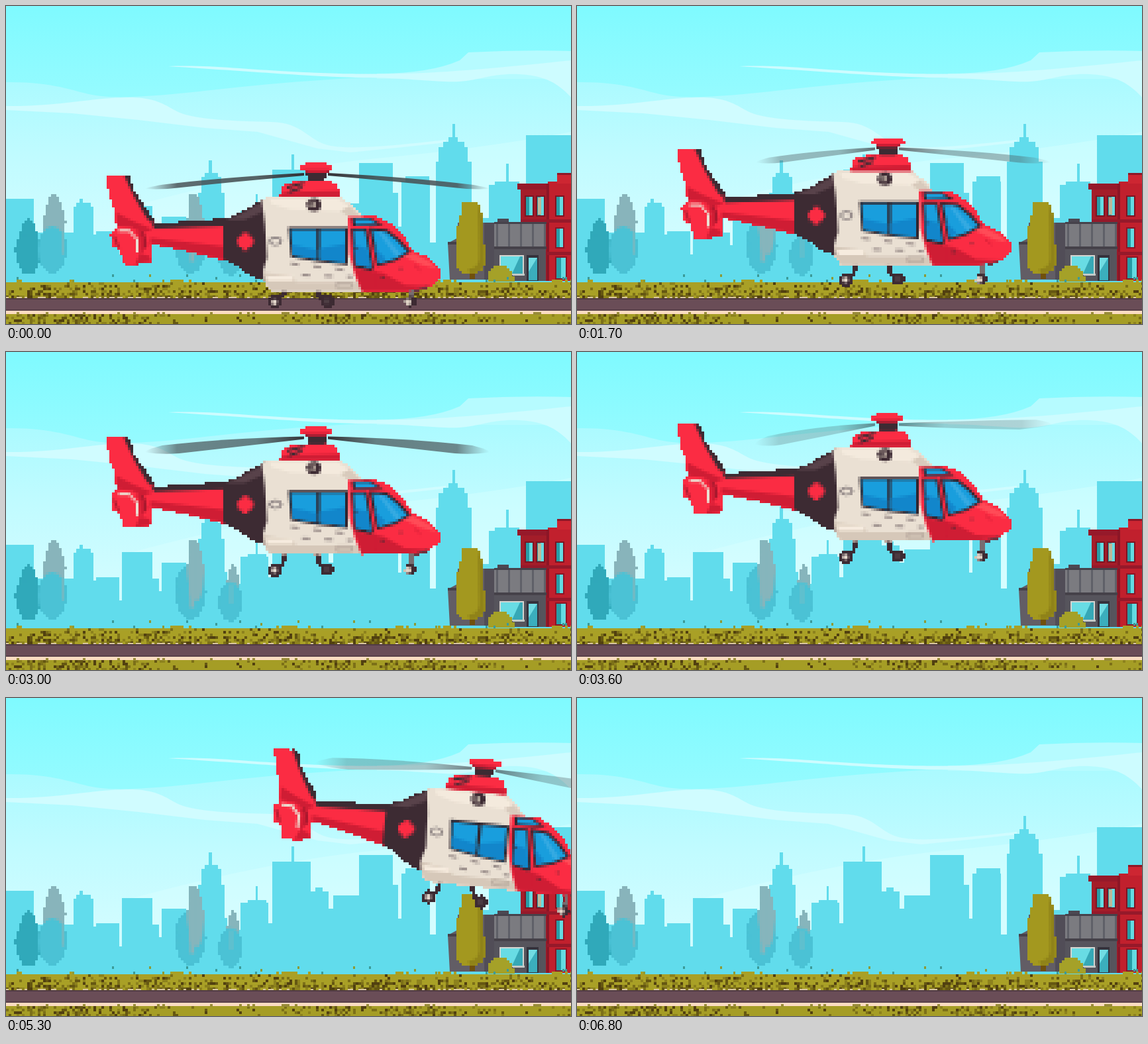
Animation, 853 px wide and 480 px high, one loop 6.9 s. Source, as an HTML page with a canvas:

```html
<!DOCTYPE html>
<html lang="en">
<head>
<meta charset="utf-8">
<title>Helicopter take-off</title>
<style>
html, body { margin: 0; width: 100%; height: 100%; overflow: hidden; background: #80fbff; }
canvas { display: block; width: 853px; height: 480px; }
</style>
</head>
<body>
<canvas id="stage" width="853" height="480"></canvas>
<script>
const W = 853, H = 480, LOOP = 6900, STEP = 100, CELL = 4;
const stage = document.getElementById('stage').getContext('2d');

function makeLayer(w, h) {
  const canvas = document.createElement('canvas');
  canvas.width = w;
  canvas.height = h;
  return canvas.getContext('2d', { willReadFrequently: true });
}

function fill(c, color, d) {
  c.fillStyle = color;
  c.fill(new Path2D(d));
}

function line(c, color, width, d) {
  c.strokeStyle = color;
  c.lineWidth = width;
  c.stroke(new Path2D(d));
}

function box(c, color, x, y, w, h) {
  c.fillStyle = color;
  c.fillRect(x, y, w, h);
}

function disc(c, color, x, y, rx, ry = rx) {
  c.fillStyle = color;
  c.beginPath();
  c.ellipse(x, y, rx, ry, 0, 0, Math.PI * 2);
  c.fill();
}

function seeded(seed) {
  return () => (seed = (seed * 16807) % 2147483647) / 2147483647;
}

// Draws at a quarter of the size with hard edges, then enlarges to blocks.
const mosaic = makeLayer(Math.ceil(W / CELL), H / CELL);
function blocky(target, draw) {
  const { width, height } = mosaic.canvas;
  mosaic.setTransform(1, 0, 0, 1, 0, 0);
  mosaic.clearRect(0, 0, width, height);
  mosaic.setTransform(1 / CELL, 0, 0, 1 / CELL, 0, 0);
  draw(mosaic);
  const image = mosaic.getImageData(0, 0, width, height);
  for (let i = 3; i < image.data.length; i += 4) image.data[i] = image.data[i] > 115 ? 255 : 0;
  mosaic.putImageData(image, 0, 0);
  target.imageSmoothingEnabled = false;
  target.drawImage(mosaic.canvas, 0, 0, width * CELL, height * CELL);
}

function gradient(c, y0, y1, ...colors) {
  const g = c.createLinearGradient(0, y0, 0, y1);
  colors.forEach((color, i) => g.addColorStop(i / (colors.length - 1), color));
  return g;
}

function drawSky(c) {
  box(c, gradient(c, 0, 130, '#7ffaff', '#94fbff'), 0, 0, W, H);
  fill(c, gradient(c, 110, 340, '#abfaff', '#c0fbff', '#d0fcff'),
    'M0 115C70 114 100 128 130 134S210 138 300 128S460 112 540 108L853 100V420H0Z');
  fill(c, 'rgba(225,254,255,.3)', 'M180 305Q400 245 560 230T853 190V420H180Z');
  fill(c, '#b6fbff', 'M560 102Q640 102 685 82L698 70Q775 66 853 68V110H560Z');
  fill(c, '#cdfcff', 'M245 91C310 89 350 95 430 99S540 103 600 102S760 92 853 82' +
    'V138C835 118 815 105 775 103S715 112 685 114S600 108 540 108S360 98 245 91Z');
  fill(c, '#d0fcff', 'M0 151C80 152 130 138 185 138S245 158 275 165S350 174 400 175S455 204 490 211' +
    'S610 208 664 202V206L600 213L520 221L470 215L380 190L300 184L200 172L100 162L0 157Z');
}

// Each pair is a left edge and the roof height from there on.
const ROOFS = [0, 291, 42, 342, 102, 303, 132, 345, 136, 340, 171, 375, 175, 302, 221, 342,
  231, 361, 235, 318, 272, 325, 290, 282, 295, 258, 325, 282, 330, 332, 334, 350, 354, 309,
  396, 340, 402, 247, 460, 292, 487, 318, 494, 298, 533, 237, 584, 282, 592, 333, 597, 265,
  640, 357, 649, 235, 703, 320, 729, 270, 785, 195, 853, 0];

function drawSkyline(c) {
  const color = '#61dcec';
  for (let i = 0; i < ROOFS.length - 2; i += 2) {
    box(c, color, ROOFS[i], ROOFS[i + 1], ROOFS[i + 2] - ROOFS[i], 420 - ROOFS[i + 1]);
  }
  const tops = [[106, 297, 22], [111, 291, 5], [300, 252, 20], [306, 233, 5], [365, 305, 28],
    [377, 284, 3], [431, 224, 4], [467, 286, 11], [603, 257, 36], [653, 213, 44],
    [660, 205, 32], [668, 198, 14], [674, 178, 4], [738, 265, 37], [755, 238, 4]];
  for (const [x, y, w] of tops) box(c, color, x, y, w, 45);
}

function drawFarTrees(c) {
  const spindle = (color, x, top, bottom, half) => fill(c, color,
    `M${x} ${top}L${x + half * .45} ${top + 8}L${x + half} ${top + 42}Q${x + half} ${bottom - 12} ${x + half * .4} ${bottom}` +
    `H${x - half * .4}Q${x - half} ${bottom - 12} ${x - half} ${top + 42}L${x - half * .45} ${top + 8}Z`);
  spindle('#30a9ba', 34, 319, 405, 18);
  fill(c, '#30a9ba', 'M22 345L13 367L20 394L34 404V345Z');
  spindle('#88b4bb', 73, 282, 378, 17);
  disc(c, '#4bc2d5', 70, 368, 22, 36);
  line(c, '#70bac4', 4, 'M86 340V375');
  disc(c, '#4bc2d5', 279, 362, 23, 42);
  spindle('#86b5bc', 286, 283, 375, 13);
  line(c, '#86b5bc', 7, 'M281 284V386');
  fill(c, '#4bc2d5', 'M258 340L269 325L276 350V400L264 392Z');
  spindle('#86b5bc', 343, 319, 364, 12);
  disc(c, '#4bc2d5', 339, 377, 18, 30);
  line(c, '#72bec8', 4, 'M340 350V380');
}

function windowPane(c, x, y, w, h, frame) {
  box(c, frame, x - 2, y - 2, w + 4, h + 4);
  box(c, '#279da6', x, y, w, h);
  box(c, '#64dbe2', x + w / 2, y, w / 2, h);
}

function drawHouses(c) {
  box(c, '#a41d29', 777, 275, 42, 140);
  box(c, '#c1202d', 818, 265, 35, 150);
  box(c, '#cd2632', 832, 254, 21, 14);
  box(c, '#8f1727', 832, 252, 21, 3);
  box(c, '#96192a', 772, 268, 48, 9);
  box(c, '#8c1626', 816, 268, 4, 147);
  for (const y of [322, 371]) box(c, '#96192a', 777, y, 76, 5);
  for (const x of [785, 802, 831]) windowPane(c, x, 288, 10, 28, '#7d1422');
  box(c, '#bdb99b', 803, 289, 5, 26);
  windowPane(c, 831, 336, 10, 28, '#8b1626');
  windowPane(c, 831, 380, 14, 31, '#8b1626');

  fill(c, '#625d65', 'M667 358L682 350V327H738V413H670Z');
  box(c, '#514d57', 722, 327, 16, 86);
  box(c, '#454049', 667, 356, 16, 4);
  box(c, '#4c4852', 742, 321, 17, 8);
  box(c, '#56545c', 737, 365, 78, 50);
  box(c, '#7b7b80', 737, 327, 78, 38);
  for (let x = 740; x < 815; x += 18) box(c, '#5f6068', x, 329, 3, 34);
  box(c, '#46424b', 737, 326, 79, 3);
  box(c, '#454149', 737, 363, 79, 4);
  box(c, '#d2d5d1', 745, 376, 37, 30);
  box(c, '#36a8b6', 747, 378, 33, 26);
  fill(c, '#68dce4', 'M747 378H776L764 404H747Z');
  box(c, '#c2cbc9', 765, 404, 18, 3);
  box(c, '#35323c', 786, 376, 18, 39);
  box(c, '#3baebd', 789, 380, 13, 34);
  fill(c, '#71dce3', 'M789 380H802L789 401Z');
}

function drawNearTrees(c) {
  line(c, '#70500d', 6, 'M703 396V413');
  fill(c, '#a3981f', 'M690 297Q703 292 714 299L720 324L722 390Q719 403 705 403Q688 405 682 397V333Z');
  fill(c, '#8f8219', 'M713 299L720 324L722 390Q719 403 705 403Q694 400 699 397Q716 395 714 377Z');
  fill(c, '#a5a128', 'M728 415V403L739 393L749 390L762 400L769 415Z');
}

function drawGround(c) {
  const random = seeded(4711);
  const cell = (color, x, y, w = 4) => box(c, color, x, y, w, 4);
  const darks = ['#655712', '#7c7018', '#514010', '#8d821d'];
  const dark = () => darks[Math.floor(random() * darks.length)];
  box(c, '#a9a026', 0, 417, W, 24);
  for (let x = 0; x < W; x += 4) {
    const crest = Math.sin(x / 31) + Math.sin(x / 13) + random() * 2;
    if (crest > 2.3) cell('#a9a025', x, 413);
    if (random() < .1) cell(random() < .5 ? '#3c9a98' : '#8c9b38', x, 405 + Math.floor(random() * 3) * 4, 3);
    for (let y = 417; y < 440; y += 4) {
      if (random() < .08 + (y - 417) / 23 * .7) cell(dark(), x, y);
    }
    if (random() < .35) box(c, '#d9c6a0', x, 439, 4, 2);
  }
  box(c, '#513b45', 0, 441, W, 3);
  box(c, '#6a4d57', 0, 443, W, 16);
  box(c, '#594149', 0, 458, W, 2);
  box(c, '#fbdcc1', 0, 460, W, 5);
  box(c, '#a59d25', 0, 465, W, 15);
  for (let x = 0; x < W; x += 4) {
    const density = .25 + .18 * Math.sin(x / 72);
    for (let y = 465; y < H; y += 4) if (random() < density) cell(dark(), x, y);
    if (random() < .1) cell('#998c38', x, 462);
  }
}

const scene = makeLayer(W, H);
drawSky(scene);
drawSkyline(scene);
blocky(scene, drawFarTrees);
drawHouses(scene);
blocky(scene, drawNearTrees);
drawGround(scene);

const RED = '#fb2c43', DEEP = '#cf1d34', DARK = '#3d2b33', CREAM = '#eae0d3', BLUE = '#199edd';

function drawGear(c, drop) {
  c.save();
  c.translate(0, drop);
  line(c, DARK, 6, 'M422 418L418 438L407 444');
  line(c, DARK, 6, 'M469 418L473 438L484 443');
  line(c, '#776d70', 5, 'M612 418V442');
  disc(c, DARK, 406, 447, 10);
  disc(c, '#e6dace', 405, 447, 4.5);
  disc(c, DARK, 485, 446, 10);
  disc(c, '#514047', 484, 446, 4);
  disc(c, DARK, 611, 446, 8.5);
  disc(c, '#e2d5c8', 607, 447, 5);
  c.restore();
}

function drawTail(c) {
  fill(c, RED, 'M150 255H181L190 277L222 326L224 334L330 331V383L270 369L218 358L221 385L196 390H178' +
    'L171 367L159 364L158 342L167 334L165 311L157 288Z');
  fill(c, DEEP, 'M167 312L190 324L221 337L206 343L190 334L168 332Z');
  fill(c, DEEP, 'M218 350L330 363V383L270 369L218 358Z');
  fill(c, DARK, 'M178 255H186L194 280L205 296L222 320V329L213 321L194 289Z');
  fill(c, DARK, 'M220 329L330 321V332L224 336Z');
  fill(c, DEEP, 'M196 340L209 343L214 361L204 374L216 377L219 385L195 390L202 374L201 348Z');
  line(c, CREAM, 4, 'M170 339H187L190 344L198 352V372');
  line(c, '#9d182c', 3, 'M204 340L210 350V365M163 347L170 365');
}

function drawBody(c) {
  fill(c, DARK, 'M328 322L350 314L388 292H397V417L372 409L349 393L328 382Z');
  fill(c, '#58424a', 'M331 323L352 315L387 296V311L360 323Z');
  fill(c, RED, 'M357 342H366V347H371V351H374V359H371V364H365V369H357V364H351V359H349V350H352V347H357Z');

  fill(c, CREAM, 'M386 292L397 288H505L526 303L540 322V430H399L391 418L388 400L394 380L391 330Z');
  fill(c, '#f4eadd', 'M398 291H500L520 304L505 310L430 307L401 299Z');
  fill(c, '#d6c8b9', 'M388 402L434 408L438 417H540V430H399L391 418Z');
  fill(c, '#f6ebde', 'M392 407H434V415H395Z');
  fill(c, '#d8cabc', 'M519 302L540 322L517 318L505 309Z');

  fill(c, RED, 'M413 288L419 270L440 264H489L500 269L505 288Z');
  fill(c, DEEP, 'M418 281L503 279L505 288H413Z');
  line(c, DARK, 4, 'M424 274L450 267M427 281L447 274');
  fill(c, DARK, 'M452 247H486L481 264H457Z');
  fill(c, DEEP, 'M447 245H490L484 252H455Z');
  fill(c, RED, 'M444 242L454 238H482L494 242V247H444Z');

  disc(c, DARK, 465, 300, 11, 10);
  fill(c, '#c9bcae', 'M455 295H467V304H457Z');
  line(c, DARK, 3, 'M460 293V306M453 299H463');
  disc(c, '#7d7375', 407, 355, 10, 7);
  disc(c, CREAM, 407, 355, 7, 4.5);
}

function drawCabin(c) {
  fill(c, '#30252e', 'M426 334H516V391L470 386L430 379Z');
  fill(c, BLUE, 'M430 338H469V382L433 376Z');
  fill(c, BLUE, 'M474 338H512V387L474 383Z');
  fill(c, '#1286cb', 'M431 360L469 368V382L433 376Z');
  fill(c, '#1286cb', 'M474 366L512 359V387L474 383Z');
  c.setLineDash([12, 22]);
  line(c, '#6f6163', 2.5, 'M430 389L515 399M447 406L523 409');
  c.setLineDash([]);
  line(c, '#a99b91', 2, 'M499 418H522V425H499Z');

  fill(c, RED, 'M516 318H559L579 327L600 345L613 368L638 380L656 397L657 409L641 423L603 430H537L527 407L518 374Z');
  fill(c, DEEP, 'M526 396L569 403L602 421L641 423L603 430H537Z');
  fill(c, '#ff4b57', 'M598 377L615 373L640 386L649 396L628 391Z');
  fill(c, '#30252e', 'M522 320H550L570 331L524 332Z');
  fill(c, BLUE, 'M526 322H549L561 329L528 330Z');
  fill(c, '#30252e', 'M521 336H545L555 396L552 400L526 394Z');
  fill(c, BLUE, 'M525 339H542L548 374L551 395L528 390Z');
  fill(c, '#1286cb', 'M526 361L546 366L551 395L528 390Z');
  fill(c, '#30252e', 'M548 335L575 337L594 352L611 371L588 385L560 393Z');
  fill(c, BLUE, 'M553 339L574 341L590 354L606 371L586 382L563 389Z');
  fill(c, '#35aae2', 'M561 340L568 341L596 374L589 379Z');
  fill(c, '#1286cb', 'M556 364L573 381L563 389Z');
  line(c, DEEP, 2, 'M558 399V424M616 391L626 399');
  line(c, DARK, 2, 'M524 366H531M566 410H572M594 397H598');
  line(c, '#6d3440', 3, 'M617 431L637 424');
}

// Reach and droop of both blades through one rotor turn.
const TURN = [
  { left: [258, 21], right: [262, 21], alpha: .85 },
  { left: [200, 29], right: [250, 0], alpha: .36 },
  { left: [198, 20], right: [247, 20], alpha: .38 },
  { left: [254, 17], right: [258, 15], alpha: .5 },
  { left: [258, 17], right: [264, 17], alpha: .65 }
];

function drawBlade(c, side, [reach, droop], width, alpha) {
  const tip = side * reach, near = side * 18;
  const g = c.createLinearGradient(near, 0, tip, 0);
  g.addColorStop(0, `rgba(50,48,52,${Math.min(1, alpha + .3)})`);
  g.addColorStop(.3, `rgba(65,73,76,${alpha})`);
  g.addColorStop(.8, `rgba(75,84,88,${alpha})`);
  g.addColorStop(1, 'rgba(95,110,114,0)');
  c.fillStyle = g;
  c.fill(new Path2D(`M${near} -3Q${tip * .55} ${droop * .3 - width * .45} ${tip * .9} ${droop * .85 - width * .5}` +
    `Q${tip} ${droop - width * .25} ${tip} ${droop}Q${tip * .9} ${droop + width * .25} ${tip * .8} ${droop * .8 + width * .4}` +
    `Q${tip * .45} ${droop * .35 + width * .35} ${near} 1Z`));
}

function ease(t, from, to) {
  const p = Math.min(1, Math.max(0, (t - from) / (to - from)));
  return (1 - Math.cos(Math.PI * p)) / 2;
}

function draw(t) {
  const hubX = 468, hubY = 255;
  const x = 1.325e-4 * Math.max(0, t - 3918) ** 2;
  const y = -146 * ease(t, 600, 3800);
  const tilt = 6.1 * ease(t, 3700, 5100) * Math.PI / 180;
  const place = c => {
    c.translate(hubX + x, hubY + y);
    c.rotate(tilt);
  };

  stage.drawImage(scene.canvas, 0, 0);
  blocky(stage, c => {
    place(c);
    c.translate(-hubX, -hubY);
    drawGear(c, 7 * ease(t, 600, 2400));
    drawTail(c);
    drawBody(c);
    drawCabin(c);
  });

  const pose = TURN[t / STEP % TURN.length];
  const width = 6 + 12 * ease(t, 0, 4800);
  const alpha = pose.alpha * (1 - .4 * ease(t, 1700, 4400));
  stage.save();
  place(stage);
  drawBlade(stage, -1, pose.left, width, alpha);
  drawBlade(stage, 1, pose.right, width, alpha);
  stage.restore();
}

const start = performance.now();
function tick() {
  const elapsed = (performance.now() - start) % LOOP;
  draw(Math.floor(elapsed / STEP) * STEP);
  requestAnimationFrame(tick);
}
tick();
</script>
</body>
</html>
```
